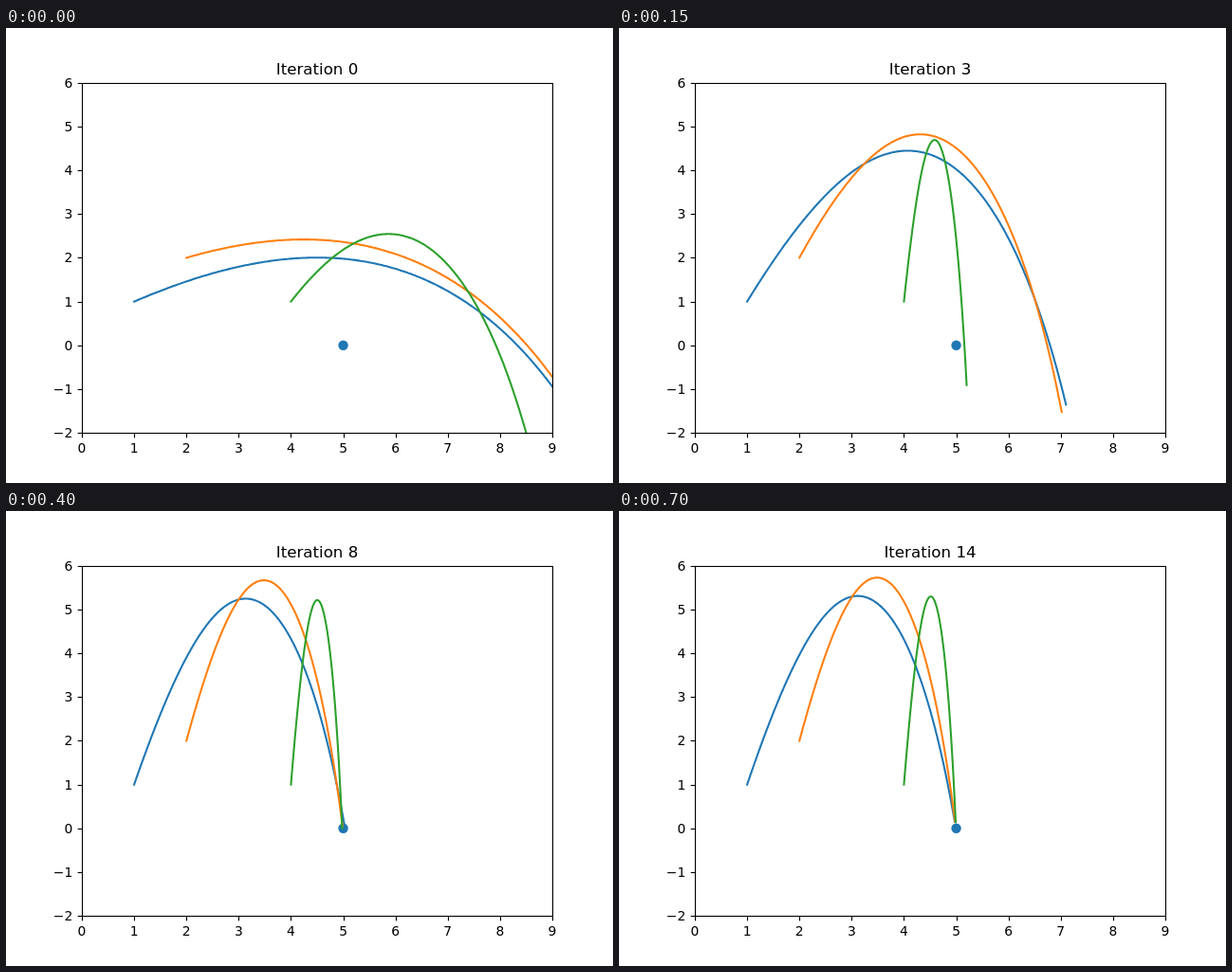
Recreate the animation shown at these times as an HTML page with a canvas. Size 640 by 480 pixels, loop 0.75 s.

```html
<!DOCTYPE html>
<html lang="en">
<head>
<meta charset="utf-8">
<title>Trajectory fitting</title>
<style>
  html, body { margin: 0; width: 100%; height: 100%; overflow: hidden; background: #fff; }
  canvas { display: block; }
</style>
</head>
<body>
<canvas id="stage" width="640" height="480"></canvas>
<script>
const ctx = document.getElementById('stage').getContext('2d');

const STEP_MS = 50, STEPS = 15;
const GRAVITY = 9.81, DRAG = 0.1, FLIGHT = 1.985, DT = 0.005;
const DECAY = 0.6; // share of the remaining error left after one iteration
const BOX = { left: 80, right: 576, top: 57.6, bottom: 427.2 };
const KEYS = [0, 2, 4, 6, 8, 10, 14];

// Each shot: start point and, per key iteration, [peak height, x, y of a point on the way down].
const SHOTS = [
  { color: '#1f77b4', start: [1, 1], goals: [
    [2.004, 9, -0.94], [3.833, 8.374, -2], [4.818, 6.197, -0.7], [5.14, 5.271, -0.145],
    [5.245, 5.03, 0.03], [5.283, 4.985, 0.06], [5.307, 4.975, 0.13]] },
  { color: '#ff7f0e', start: [2, 2], goals: [
    [2.418, 9, -0.72], [4.154, 8.437, -2], [5.23, 5.965, -0.75], [5.559, 5.126, -0.16],
    [5.665, 4.99, 0.02], [5.703, 4.98, 0.06], [5.725, 4.98, 0.13]] },
  { color: '#2ca02c', start: [4, 1], goals: [
    [2.543, 8.5, -2], [4.348, 5.525, -1.54], [4.894, 5.008, -0.565], [5.113, 4.981, -0.18],
    [5.212, 4.98, 0], [5.256, 4.985, 0.06], [5.295, 4.99, 0.13]] }
];

const px = x => BOX.left + x * (BOX.right - BOX.left) / 9;
const py = y => BOX.bottom - (y + 2) * (BOX.bottom - BOX.top) / 8;
const snap = v => Math.floor(v + 0.5) + 0.5;

function accel(vx, vy) {
  const k = DRAG * Math.hypot(vx, vy);
  return [-k * vx, -GRAVITY - k * vy];
}

// Midpoint integration of a shot with quadratic air drag.
function advance(s) {
  const [ax, ay] = accel(s.vx, s.vy);
  const mx = s.vx + ax * DT / 2, my = s.vy + ay * DT / 2;
  const [bx, by] = accel(mx, my);
  return { x: s.x + mx * DT, y: s.y + my * DT, vx: s.vx + bx * DT, vy: s.vy + by * DT };
}

const launch = ([x, y], [vx, vy]) => ({ x, y, vx, vy });

function measure(start, velocity, level) {
  let s = launch(start, velocity), last = s, peak = s.y;
  while (s.vy > 0 || s.y > level) {
    last = s;
    s = advance(s);
    peak = Math.max(peak, s.y);
  }
  const part = (last.y - level) / (last.y - s.y);
  return { peak, x: last.x + part * (s.x - last.x) };
}

// Launch velocity that reaches the given peak and then passes through (x, y).
function aim(start, [peak, x, y]) {
  let vx = 4, vy = 8;
  for (let i = 0; i < 50; i++) {
    const m = measure(start, [vx, vy], y);
    vx *= (x - start[0]) / (m.x - start[0]);
    vy *= Math.sqrt((peak - start[1]) / (m.peak - start[1]));
  }
  return [vx, vy];
}

function velocityAt(keyed, n) {
  let i = 0;
  while (i < KEYS.length - 2 && KEYS[i + 1] <= n) i++;
  const f = (1 - DECAY ** (n - KEYS[i])) / (1 - DECAY ** (KEYS[i + 1] - KEYS[i]));
  return keyed[i].map((v, axis) => v + (keyed[i + 1][axis] - v) * f);
}

function trace(start, velocity) {
  const path = new Path2D();
  let s = launch(start, velocity);
  path.moveTo(px(s.x), py(s.y));
  for (let i = 0; i < Math.round(FLIGHT / DT); i++) {
    s = advance(s);
    path.lineTo(px(s.x), py(s.y));
  }
  return path;
}

for (const shot of SHOTS) {
  const keyed = shot.goals.map(goal => aim(shot.start, goal));
  shot.paths = Array.from({ length: STEPS }, (_, n) => trace(shot.start, velocityAt(keyed, n)));
}

function line(x1, y1, x2, y2) {
  ctx.beginPath();
  ctx.moveTo(x1, y1);
  ctx.lineTo(x2, y2);
  ctx.stroke();
}

function label(text, x, y, size, align) {
  ctx.font = size + 'px "DejaVu Sans", sans-serif';
  ctx.textAlign = align;
  ctx.fillText(text, x, y);
}

function drawAxes() {
  const left = snap(BOX.left), right = snap(BOX.right);
  const top = snap(BOX.top), bottom = snap(BOX.bottom);
  ctx.strokeStyle = ctx.fillStyle = '#000';
  ctx.lineWidth = 1.11;
  ctx.lineCap = 'butt';
  ctx.lineJoin = 'miter';
  ctx.strokeRect(left, top, right - left, bottom - top);
  for (let x = 0; x <= 9; x++) {
    line(snap(px(x)), bottom, snap(px(x)), bottom + 4.86);
    label(String(x), px(x), 448, 13.89, 'center');
  }
  for (let y = -2; y <= 6; y++) {
    line(left, snap(py(y)), left - 4.86, snap(py(y)));
    label(String(y).replace('-', '\u2212'), 70.3, Math.round(py(y)) + 5, 13.89, 'right');
  }
}

function drawPlot(n) {
  ctx.save();
  ctx.beginPath();
  ctx.rect(BOX.left, BOX.top, BOX.right - BOX.left, BOX.bottom - BOX.top);
  ctx.clip();
  ctx.fillStyle = SHOTS[0].color;
  ctx.beginPath();
  ctx.arc(px(5), py(0), 5.2, 0, Math.PI * 2);
  ctx.fill();
  ctx.lineWidth = 2.08;
  ctx.lineCap = 'square';
  ctx.lineJoin = 'round';
  for (const shot of SHOTS) {
    ctx.strokeStyle = shot.color;
    ctx.stroke(shot.paths[n]);
  }
  ctx.restore();
}

function draw(now) {
  const n = Math.floor(now / STEP_MS) % STEPS;
  ctx.fillStyle = '#fff';
  ctx.fillRect(0, 0, 640, 480);
  drawPlot(n);
  drawAxes();
  label('Iteration ' + n, 328, 49, 16.67, 'center');
}

let origin;
function tick(now) {
  origin ??= now;
  draw(Math.max(0, now - origin));
  requestAnimationFrame(tick);
}
draw(0);
requestAnimationFrame(tick);
</script>
</body>
</html>
```
